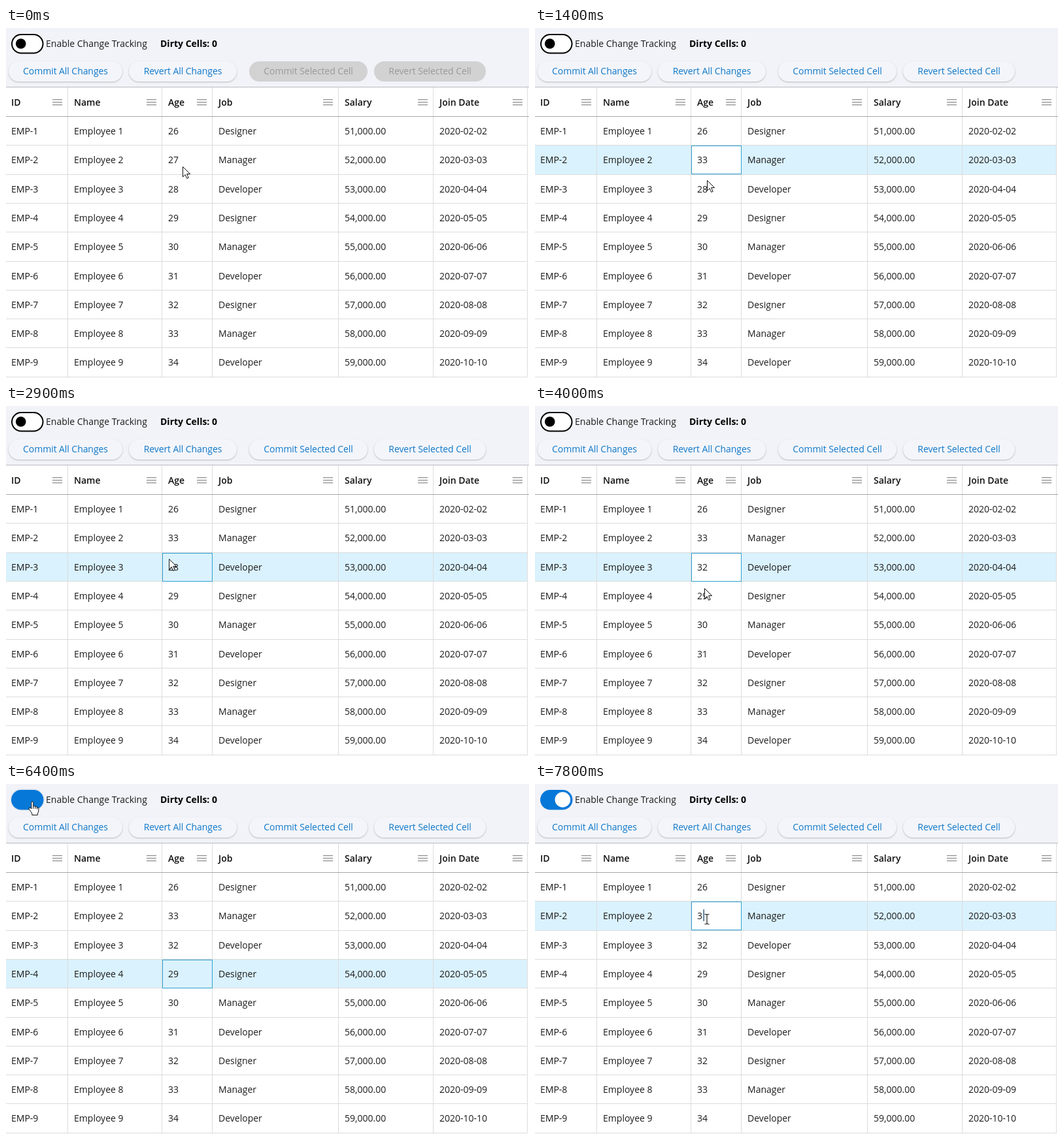
Recreate the animation shown at these times as an HTML page. Size 800 by 536 pixels, loop 8000 ms.

```html
<!DOCTYPE html>
<html lang="en">
<head>
<meta charset="utf-8">
<title>Change tracking grid</title>
<style>
html, body { margin: 0; width: 100%; height: 100%; overflow: hidden; background: #fff; }
svg { display: block; width: 800px; height: 536px; font: 14px "Open Sans", "Noto Sans", sans-serif; }
text { fill: #1c1c1c; white-space: pre; }
.head { font-weight: 600; fill: #111; }
.bold { font-weight: 700; fill: #000; }
.line { fill: #dcdcdc; }
.icon { fill: #929292; }
.btn rect { fill: #f4f5fa; filter: drop-shadow(0 1px 1px rgba(0, 0, 0, .24)); }
.btn text { fill: #0f78c8; text-anchor: middle; letter-spacing: -.07px; }
.btn.off rect { fill: #d2d2d2; filter: none; }
.btn.off text { fill: #999; }
.pointer { fill: #fff; stroke: #111; stroke-linejoin: round; }
</style>
</head>
<body>
<svg id="stage" viewBox="0 0 800 536">
  <rect width="800" height="90" fill="#f2f3f8"/>
  <g id="off">
    <rect x="9" y="10" width="47.5" height="28.5" rx="14.25" fill="#fff" stroke="#000" stroke-width="2"/>
    <circle cx="22.7" cy="24" r="7.8"/>
  </g>
  <g id="on">
    <rect id="halo" x="6.5" y="7" width="52.5" height="34" rx="17" fill="#e4e8ef"/>
    <rect x="8" y="9" width="49.5" height="30.5" rx="15.25" fill="#0578d8"/>
    <circle id="knob" cx="42.3" cy="24" r="11.8" fill="#fff"/>
  </g>
  <text x="61" y="29">Enable Change Tracking</text>
  <text x="236" y="29" class="bold">Dirty Cells: 0</text>
  <g id="buttons"></g>
  <rect id="band" width="798" height="44" fill="#daf2fe"/>
  <g id="grid"></g>
  <rect id="cell" x="239.5" width="76" height="43" stroke="#2f9fd2"/>
  <g id="cells"></g>
  <rect id="caret" width="1.3" height="18" fill="#174a70"/>
  <g id="cursor">
    <path id="arrow" class="pointer" d="M.5 .5V16l3.6-3.4 2.6 5.8 2.5-1.1-2.6-5.7h5z"/>
    <path id="hand" class="pointer" d="M-1.5 11V1.5q0-1.500 1.500-1.500t1.500 1.500V7q2.500-1 3 .8 2.300-.8 2.700 1 2.300-.5 2.300 1.700V14q0 2-1.500 4v2.500H-.5V18l-4.600-6.500q-1-2 .8-2.200 1.300 0 2.800 1.700zM1.500 7v4M4.500 8v3M7.200 9v2.500"/>
    <path id="beam" fill="none" stroke="#222" stroke-width="1.2" d="M-3.500-7.500h2.500l1 1 1-1h2.500M0-6.500v13M-3.500 7.500h2.500l1-1 1 1h2.500"/>
  </g>
</svg>
<script>
const $ = id => document.getElementById(id);
const show = (id, on) => $(id).setAttribute("visibility", on ? "inherit" : "hidden");

function add(parent, tag, attrs, label) {
  const el = document.createElementNS("http://www.w3.org/2000/svg", tag);
  for (const key in attrs) el.setAttribute(key, attrs[key]);
  if (label !== undefined) el.textContent = label;
  return parent.appendChild(el);
}

const PITCH = 44.3;
const rowTop = i => Math.round(136 + PITCH * i);
const edges = [94, 238, 315, 508, 653, 798];
const titles = ["ID", "Name", "Age", "Job", "Salary", "Join Date"];
const jobs = ["Designer", "Manager", "Developer"];
const textX = c => c ? edges[c - 1] + 10 : 8;

const buttons = [
  [4, 174, "Commit All Changes"],
  [188, 165, "Revert All Changes"],
  [372, 181, "Commit Selected Cell"],
  [563, 171, "Revert Selected Cell"]
].map(([x, width, label]) => {
  const g = add($("buttons"), "g", { class: "btn" });
  add(g, "rect", { x, y: 51, width, height: 31, rx: 15.5 });
  add(g, "text", { x: x + width / 2, y: 71 }, label);
  return g;
});

const grid = $("grid");
edges.forEach((x, c) => {
  add(grid, "rect", { class: "line", x: x - (c === 5 ? 1 : 0), y: 91, width: 1, height: 444 });
  for (let k = 0; k < 3; k++)
    add(grid, "rect", { class: "icon", x: x - 23, y: 109 + 4 * k, width: 15, height: 1.3 });
  add(grid, "text", { class: "head", x: textX(c), y: 119 }, titles[c]);
});
add(grid, "rect", { y: 90, width: 800, height: 1, fill: "#b9bbbf" });
add(grid, "rect", { y: 135, width: 800, height: 1, fill: "#a6a6a6" });

const ages = [];
for (let i = 0; i < 9; i++) {
  add(grid, "rect", { class: "line", y: rowTop(i + 1) - 1, width: 798, height: 1 });
  const n = String(i + 2).padStart(2, "0");
  const values = ["EMP-" + (i + 1), "Employee " + (i + 1), 26 + i, jobs[i % 3],
    51 + i + ",000.00", `2020-${n}-${n}`];
  values.forEach((v, c) => {
    const el = add($("cells"), "text", { x: textX(c), y: Math.round(163 + PITCH * i) }, v);
    if (c === 2) ages.push(el);
  });
}

// time, selected row, editing, ages of rows 2 and 3
const steps = [
  [0, -1, 0, "27", "28"],
  [300, 1, 0, "27", "28"],
  [500, 1, 1, "27", "28"],
  [700, 1, 1, "2", "28"],
  [800, 1, 1, "", "28"],
  [900, 1, 1, "3", "28"],
  [1000, 1, 1, "33", "28"],
  [1600, 2, 0, "33", "28"],
  [3400, 2, 1, "33", "28"],
  [3500, 2, 1, "33", "2"],
  [3600, 2, 1, "33", ""],
  [3700, 2, 1, "33", "3"],
  [3800, 2, 1, "33", "32"],
  [4200, 3, 0, "33", "32"],
  [7000, 1, 0, "33", "32"],
  [7400, 1, 1, "33", "32"],
  [7700, 1, 1, "3", "32"]
];

// time, x, y, pointer shape from that time on
const path = [
  [0, 270, 212, "arrow"],
  [300, 263, 205, "arrow"],
  [500, 263, 207, "beam"],
  [1100, 263, 207, "beam"],
  [1300, 263, 228, "arrow"],
  [1400, 263, 233, "arrow"],
  [1600, 262, 243, "arrow"],
  [1700, 260, 240, "arrow"],
  [2000, 184, 162, "arrow"],
  [2300, 184, 162, "arrow"],
  [3000, 260, 246, "arrow"],
  [3400, 260, 250, "beam"],
  [3800, 260, 250, "beam"],
  [3900, 260, 268, "arrow"],
  [4000, 259, 279, "arrow"],
  [4200, 259, 287, "arrow"],
  [4400, 257, 284, "arrow"],
  [4800, 130, 120, "hand"],
  [4900, 114, 95, "hand"],
  [5100, 98, 62, "hand"],
  [5400, 92, 60, "hand"],
  [5900, 42, 27, "hand"],
  [6500, 40, 27, "hand"],
  [6600, 60, 50, "arrow"],
  [6900, 263, 203, "arrow"],
  [7400, 263, 207, "beam"],
  [8000, 263, 207, "beam"]
];

const lastAt = (list, t) => list.filter(k => k[0] <= t).pop();

function draw(t) {
  const [, row, editing, age2, age3] = lastAt(steps, t);
  ages[1].textContent = age2;
  ages[2].textContent = age3;
  buttons.forEach((b, i) => b.classList.toggle("off", i > 1 && row < 0));

  show("band", row >= 0);
  show("cell", row >= 0);
  const y = rowTop(Math.max(row, 0));
  $("band").setAttribute("y", y);
  $("cell").setAttribute("y", y + .5 - 0.0);
  $("cell").setAttribute("fill", editing ? "#fff" : "#daf2fe");

  const typed = row === 1 ? age2 : age3;
  show("caret", editing && typed.length < 2);
  $("caret").setAttribute("x", 249.5 + 8 * typed.length);
  $("caret").setAttribute("y", y + 12);

  show("off", t < 6300);
  show("on", t >= 6300);
  show("halo", t >= 6300 && t < 6600);
  show("knob", t >= 6500);

  const a = lastAt(path, t);
  const b = path[path.indexOf(a) + 1] || a;
  const p = b === a ? 0 : (t - a[0]) / (b[0] - a[0]);
  const mix = i => a[i] + (b[i] - a[i]) * p;
  $("cursor").setAttribute("transform", `translate(${mix(1)} ${mix(2)})`);
  for (const id of ["arrow", "hand", "beam"]) show(id, id === a[3]);
}

const start = performance.now();
function tick() {
  // the screen refreshes ten times a second
  draw(Math.floor((performance.now() - start) % 8000 / 100) * 100);
  requestAnimationFrame(tick);
}
tick();
</script>
</body>
</html>
```
